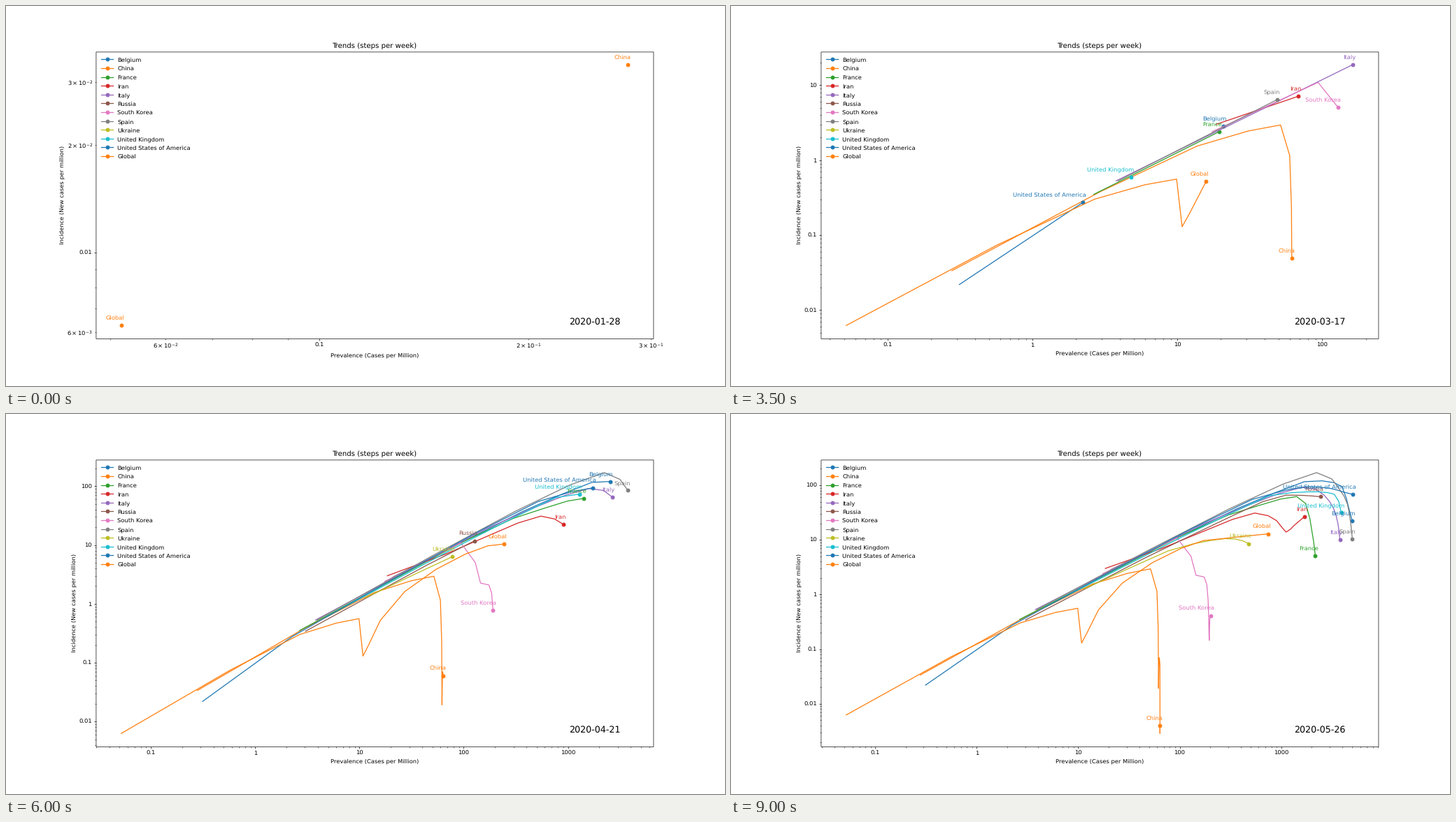
A matplotlib script that plays this animation: 1028 px wide and 544 px high, repeating every 10 s.

```python
import numpy as np
import matplotlib.pyplot as plt
from matplotlib.animation import FuncAnimation

W, H = 1028, 544
DPI = W / 17
STEP_MS = 500
FRAMES = 20
LAST = 18

plt.rcParams["font.family"] = "DejaVu Sans"
plt.rcParams["text.hinting"] = "none"
fig = plt.figure(figsize=((W + 0.01) / DPI, (H + 0.01) / DPI), dpi=DPI,
                 facecolor="white")
ax = fig.add_axes([0.125, 0.125, 0.775, 0.755])
ax.set_xscale("log")
ax.set_yscale("log")
ax.xaxis.set_major_formatter("{x:g}")
ax.yaxis.set_major_formatter("{x:g}")
ax.set_title("Trends (steps per week)")
ax.set_xlabel("Prevalence (Cases per Million)")
ax.set_ylabel("Incidence (New cases per million)")
stamp = ax.text(0.849, 0.05, "", transform=ax.transAxes, fontsize=15)

# a soft border between whole pixels instead of the snapped spines
ax.spines[:].set_visible(False)
fig.add_artist(plt.Rectangle((128.9 / W, 1 - 476.4 / H), 797 / W, 410.5 / H,
                             fill=False, lw=0.8, snap=False))


def smooth_log(weeks, knots, values):
    """Cubic curve through the key values in log space, without overshoot."""
    v = np.log(values)
    gap = np.diff(knots)
    rate = np.diff(v) / gap
    a, b = rate[:-1], rate[1:]
    inner = 2 * np.maximum(a * b, 0) / (a + b)
    slope = np.concatenate([[1.5 * rate[0] - 0.5 * inner[0]], inner,
                            [1.5 * rate[-1] - 0.5 * inner[-1]]])
    i = np.clip(np.searchsorted(knots, weeks, side="right") - 1,
                0, len(gap) - 1)
    t = (weeks - knots[i]) / gap[i]
    blend = t * t * (3 - 2 * t)
    bend = gap[i] * t * (1 - t) * ((1 - t) * slope[i] - t * slope[i + 1])
    return np.exp(v[i] + blend * (v[i + 1] - v[i]) + bend)


class Track:
    """One region: weekly incidence, with prevalence as its running sum.

    Key values are spread evenly from the first week to the last one,
    unless their weeks are given.
    """

    all = []

    def __init__(self, name, start, total, *keys, weeks=None):
        index = len(Track.all)
        color = f"C{index % 10}"
        knots = np.array(weeks or np.linspace(start, LAST, len(keys)))
        self.start = start
        self.y = smooth_log(np.arange(start, LAST + 1), knots, keys)
        self.x = total + 7 * (np.cumsum(self.y) - self.y[0])
        self.line, = ax.plot([], [], color=color)
        self.dot, = ax.plot([], [], "o", color=color)
        self.label = ax.annotate(name, (1, 1), xytext=(5, 10), ha="right",
                                 textcoords="offset points", color=color)
        self.add_key(name, color, 76.5 + 12.6 * index)
        Track.all.append(self)

    def add_key(self, name, color, y):
        up = 1 - y / H
        key = dict(color=color, transform=fig.transFigure, clip_on=False)
        fig.add_artist(plt.Line2D([136 / W, 153 / W], [up, up], **key))
        fig.add_artist(plt.Line2D([144.5 / W], [up], marker="o", **key))
        fig.text(159.2 / W, up - 3.2 / H, name)

    def show(self, week):
        n = week - self.start + 1
        visible = n > 0
        for part in (self.line, self.dot, self.label):
            part.set_visible(visible)
        if not visible:
            return [], []
        x, y = self.x[:n], self.y[:n]
        self.line.set_data(x, y)
        self.dot.set_data(x[-1:], y[-1:])
        self.label.xy = (x[-1], y[-1])
        return x, y


# name, first week, prevalence then, key values of incidence
Track("Belgium", 7, 20.9, 2.85, 43, 122, 104, 40, 22.3)
Track("China", 0, 0.2777, 0.0336, 1.55, 2.95, 0.24, 0.0192, 0.07, 0.05,
      0.00287, 0.004, weeks=(0, 2, 4, 6, 8, 10, 13, 15, 18))
Track("France", 6, 2.65, 0.35, 28.4, 62, 14, 5.1)
Track("Iran", 6, 18.5, 3, 14, 31, 22.5, 13.9, 18.7, 26.7)
Track("Italy", 5, 3.78, 0.53, 33, 92, 53, 25, 10.2)
Track("Russia", 9, 3.03, 0.342, 11.8, 66, 61.5)
Track("South Korea", 5, 17.4, 2.4, 10.9, 2.25, 2.09, 0.145, 0.37, 0.41,
      weeks=(5, 6, 8, 10, 15, 16, 18))
Track("Spain", 6, 3.9, 0.53, 37, 170, 85, 45, 20, 10.4)
Track("Ukraine", 10, 11.2, 1.25, 8, 10.6, 8.55)
Track("United Kingdom", 7, 4.8, 0.6, 13.7, 71, 76, 70, 31.3)
Track("United States of America", 6, 0.313, 0.022, 2.4, 55, 94, 88, 75, 68.2)
Track("Global", 0, 0.0518, 0.00626, 0.302, 0.56, 0.1295, 3.85, 9.7, 12.9,
      weeks=(0, 2, 4, 5, 9, 11, 18))


def padded(values):
    low, high = np.log10(min(values)), np.log10(max(values))
    pad = 0.05 * (high - low)
    return 10 ** (low - pad), 10 ** (high + pad)


def draw(frame):
    week = min(frame, LAST)
    xs, ys = [], []
    for track in Track.all:
        x, y = track.show(week)
        xs.extend(x)
        ys.extend(y)
    ax.set_xlim(*padded(xs))
    ax.set_ylim(*padded(ys))
    # the date stops one week before the data does
    stamp.set_text(str(np.datetime64("2020-01-28") + 7 * min(week, LAST - 1)))
    return []


anim = FuncAnimation(fig, draw, frames=FRAMES, init_func=lambda: draw(0),
                     interval=STEP_MS, repeat=True, repeat_delay=0, blit=False)
plt.show()
```
